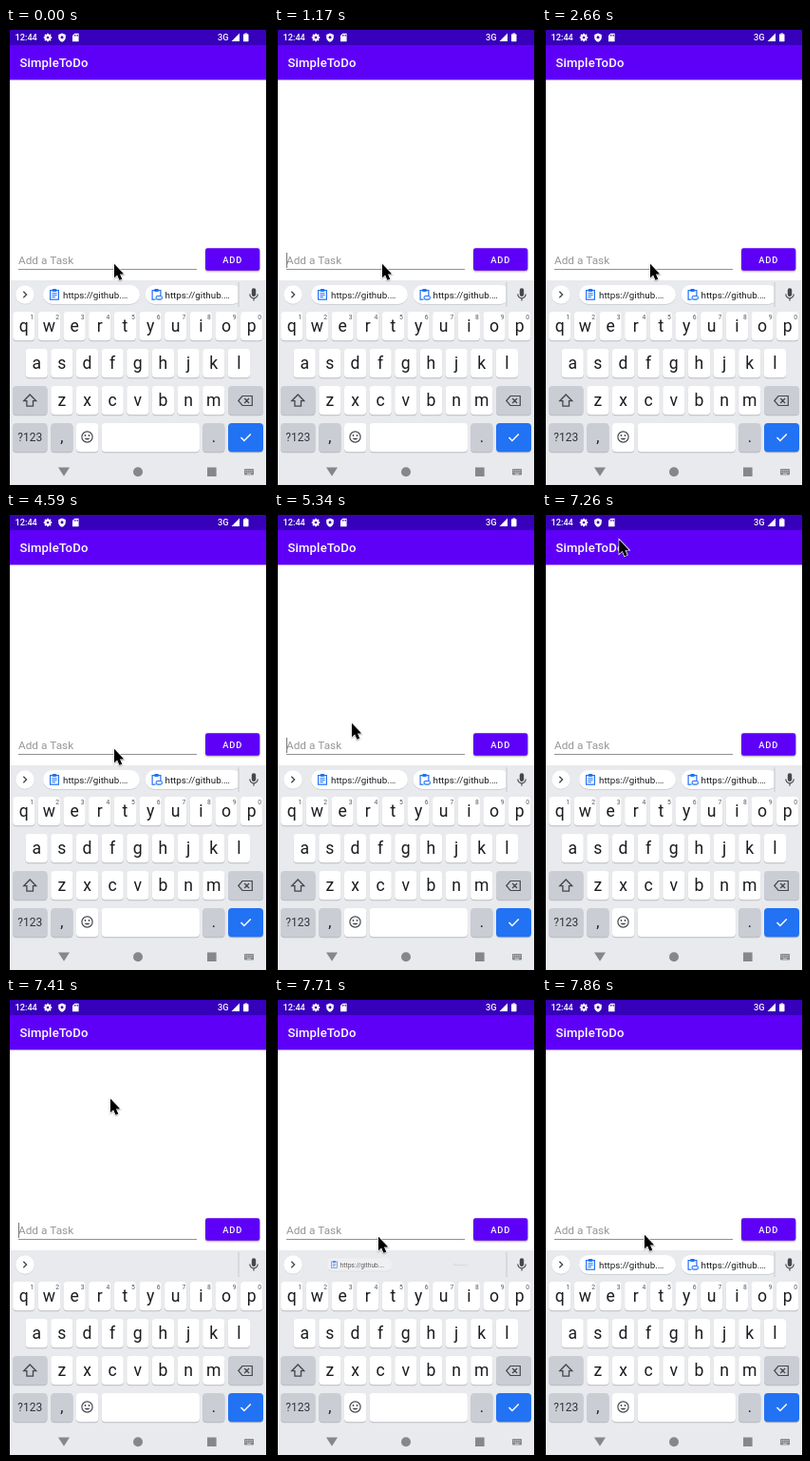
Write an HTML page with a canvas that moves like this. It is 276 px wide and 480 px high and loops after 8000 ms.

```html
<!DOCTYPE html>
<html lang="en">
<head>
<meta charset="utf-8">
<style>
  html, body { margin: 0; width: 100%; height: 100%; overflow: hidden; background: #000; }
  canvas { display: block; width: 276px; height: 480px; }
</style>
</head>
<body>
<canvas id="stage"></canvas>
<script>
const W = 276, H = 480, LOOP = 8000;
const canvas = document.getElementById('stage');
const ctx = canvas.getContext('2d');
const dpr = window.devicePixelRatio || 1;
canvas.width = W * dpr;
canvas.height = H * dpr;

const PURPLE = '#5e00f7', DARK_PURPLE = '#3700ba', BLUE = '#2272f4';
const PANEL = '#e8eaed', SPECIAL = '#cbcdd5', INK = '#1b1c1f', ICON = '#44474c';

// Start time, tip x, tip y; a missing position hides the pointer.
const pointerSteps = [
  [0, 114, 248], [5190, 93, 247.5], [5340, 82, 221], [5490, 76, 185], [5640, 78, 59],
  [5780, 89.5, -6], [5930], [7260, 81.5, 28.5], [7410, 110, 106], [7560, 110, 251], [7860, 108, 249]
];
const caretToggles = [130, 570, 1170, 1610, 2060, 2660, 3100, 3550, 4000, 4590,
  5040, 5640, 6070, 6520, 7410, 7710];

function rect(x, y, w, h, color) {
  ctx.fillStyle = color;
  ctx.fillRect(x, y, w, h);
}

function round(x, y, w, h, r, color) {
  ctx.fillStyle = color;
  ctx.beginPath();
  ctx.roundRect(x, y, w, h, r);
  ctx.fill();
}

function disc(x, y, r, color) {
  ctx.fillStyle = color;
  ctx.beginPath();
  ctx.arc(x, y, r, 0, Math.PI * 2);
  ctx.fill();
}

function ring(x, y, r, color, width) {
  ctx.strokeStyle = color;
  ctx.lineWidth = width;
  ctx.beginPath();
  ctx.arc(x, y, r, 0, Math.PI * 2);
  ctx.stroke();
}

function shape(d, x, y, { fill, stroke, width = 1.2 }) {
  const path = new Path2D(d);
  ctx.save();
  ctx.translate(x, y);
  if (stroke) {
    ctx.strokeStyle = stroke;
    ctx.lineWidth = width;
    ctx.stroke(path);
  }
  if (fill) {
    ctx.fillStyle = fill;
    ctx.fill(path);
  }
  ctx.restore();
}

function text(str, x, y, size, color, { weight = 400, align = 'left', spacing = 0 } = {}) {
  ctx.font = `${weight} ${size}px Roboto, sans-serif`;
  ctx.textAlign = align;
  ctx.letterSpacing = spacing + 'px';
  ctx.fillStyle = color;
  ctx.fillText(str, x, y);
}

function drawStatusBar() {
  rect(4, 2, 270, 16, DARK_PURPLE);
  text('12:44', 9.5, 13.3, 9.2, '#fff', { weight: 500 });
  for (let i = 0; i < 4; i++) {
    ctx.save();
    ctx.translate(44, 10);
    ctx.rotate(i * Math.PI / 4);
    rect(-1, -4.2, 2, 8.4, '#fff');
    ctx.restore();
  }
  ring(44, 10, 2.4, '#fff', 1.8);
  disc(44, 10, 1.3, DARK_PURPLE);
  shape('M0-4.5L3.8-3V0Q3.6 3.3 0 4.8Q-3.6 3.3-3.8 0V-3Z', 59, 10, { fill: '#fff' });
  disc(59, 9.8, 1.5, DARK_PURPLE);
  shape('M-1-4.2H3.3V4.2H-3.3V-2Z', 73.3, 10, { fill: '#fff' });
  for (let i = 0; i < 3; i++) rect(72 + i * 1.6, 7, 0.8, 1.6, DARK_PURPLE);
  text('3G', 223, 13.3, 9.2, '#fff', { weight: 500 });
  shape('M0 0V-8.5L-8.5 0Z', 246, 14, { fill: '#fff' });
  round(250, 6.2, 5.5, 8, 0.7, '#fff');
  rect(251.6, 5.4, 2.3, 1, '#fff');
}

function drawApp(caretOn) {
  rect(4, 54, 270, 211, '#fff');
  rect(4, 18, 270, 36.5, PURPLE);
  text('SimpleToDo', 14.4, 41.3, 13.1, '#fff', { weight: 500, spacing: 0.17 });
  text('Add a Task', 13, 248.2, 11.8, '#969696');
  rect(13, 253, 188, 0.9, '#858585');
  ctx.save();
  ctx.shadowColor = 'rgba(0,0,0,.35)';
  ctx.shadowBlur = 2 * dpr;
  ctx.shadowOffsetY = dpr;
  round(210, 231.3, 57.3, 23.5, 2.4, PURPLE);
  ctx.restore();
  text('ADD', 228.3, 246.5, 9.3, '#fff', { weight: 500, spacing: 0.8 });
  if (caretOn) rect(13, 236, 1, 16, '#777');
}

function drawClipboard(x, y, linked) {
  ctx.strokeStyle = BLUE;
  ctx.lineWidth = 1.2;
  ctx.strokeRect(x - 4.4, y - 4.4, 8.8, 9.6);
  round(x - 2.4, y - 6, 4.8, 3, 1, BLUE);
  if (linked) {
    rect(x - 1, y + 1, 7, 5, '#fff');
    ctx.strokeStyle = BLUE;
    ctx.lineWidth = 1.1;
    ctx.beginPath();
    ctx.roundRect(x - 0.5, y + 1.5, 6.5, 3.6, 1.8);
    ctx.stroke();
  } else {
    for (let i = 0; i < 3; i++) rect(x - 2.6, y - 1.8 + i * 2, i === 2 ? 3.5 : 5.2, 1, BLUE);
  }
}

function drawChip(center, scale, linked) {
  if (!scale) return;
  ctx.save();
  ctx.beginPath();
  ctx.rect(36, 266, 208.5, 28);
  ctx.clip();
  ctx.globalAlpha = scale;
  ctx.translate(center, 280);
  ctx.scale(scale, scale);
  round(-51, -9.5, 102, 20.3, 10.2, '#c6c8cc');
  round(-51, -10, 102, 20, 10, '#fff');
  drawClipboard(-39, 0, linked);
  text('https://github.…', -30, 3.8, 9.8, INK);
  ctx.restore();
}

function drawStrip(t) {
  disc(20, 280.4, 10, '#cfd1d5');
  disc(20, 280, 9.8, '#fff');
  shape('M-1.7-3.2L1.6 0L-1.7 3.2', 20, 280, { stroke: ICON, width: 1.3 });
  const opening = t >= 7560 && t < 7860, closed = t >= 7410 && t < 7560;
  drawChip(90, closed ? 0 : opening ? 0.68 : 1, false);
  drawChip(197.5, closed ? 0 : opening ? 0.18 : 1, true);
  rect(244.6, 267, 0.9, 26, '#c3c5c9');
  round(258.8, 273.3, 4.4, 8.6, 2.2, ICON);
  shape('M-4.2 0A4.2 4.2 0 0 0 4.2 0M0 4.2V7', 261, 279.6, { stroke: ICON, width: 1.2 });
}

function key(x, y, w, color) {
  round(x, y + 1, w, 30.3, 4, '#b8bac0');
  round(x, y, w, 30.3, 4, color);
}

function letterRow(letters, firstCenter, y, numbered) {
  [...letters].forEach((letter, i) => {
    const x = firstCenter + i * 26.65;
    key(x - 11.6, y, 23.2, '#fff');
    text(letter, x, y + 21.2, 17.6, INK, { align: 'center' });
    if (numbered) text((i + 1) % 10, x + 8.6, y + 8, 6.8, '#55585d', { align: 'center' });
  });
}

function drawKeyboard() {
  letterRow('qwertyuiop', 18.8, 298, true);
  letterRow('asdfghjkl', 32.2, 337, false);
  letterRow('zxcvbnm', 58.9, 376, false);

  key(7, 376, 36.5, SPECIAL);
  shape('M0-6.5L6.5 .2H3.3V5.6H-3.3V.2H-6.5Z', 25.2, 391.5, { stroke: ICON, width: 1.3 });
  key(234, 376, 37, SPECIAL);
  shape('M-7.5 0L-3.3-5H7V5H-3.3ZM-1.2-2.5L3.8 2.5M3.8-2.5L-1.2 2.5', 252.3, 391.5, { stroke: ICON, width: 1.2 });

  key(7, 415, 36.5, SPECIAL);
  text('?123', 25.2, 434, 12, '#303338', { align: 'center' });
  key(47.3, 415, 23.2, SPECIAL);
  text(',', 58.9, 435, 16, INK, { align: 'center' });
  key(74, 415, 23.2, '#fff');
  ring(85.5, 429.5, 5.6, ICON, 1.2);
  disc(83.5, 428, 0.9, ICON);
  disc(87.5, 428, 0.9, ICON);
  shape('M-3 1.2Q0 5 3 1.2Z', 85.5, 429.5, { fill: ICON });
  key(100.6, 415, 103.3, '#fff');
  key(207.2, 415, 23.2, SPECIAL);
  text('.', 218.8, 435, 16, INK, { align: 'center' });
  key(234, 415, 37, BLUE);
  shape('M-5 0L-1.6 3.5L5.3-3.5', 252.5, 430, { stroke: '#fff', width: 1.5 });
}

function drawNavigation() {
  const gray = '#85878a';
  shape('M-6-4.5H6L0 4.8Z', 61, 466, { fill: gray });
  disc(139, 466.3, 5, gray);
  rect(212, 461.5, 9.6, 9.5, gray);
  round(251, 463, 10, 6.5, 0.8, gray);
  for (let row = 0; row < 2; row++)
    for (let col = 0; col < 4; col++) rect(252.2 + col * 2.1, 464.2 + row * 1.7, 1, 0.8, PANEL);
  rect(253.8, 467.8, 4.4, 0.8, PANEL);
}

function drawPointer(t) {
  const [, x, y] = pointerSteps.findLast(step => step[0] <= t);
  if (x === undefined) return;
  ctx.save();
  ctx.shadowColor = 'rgba(0,0,0,.3)';
  ctx.shadowBlur = 1.5 * dpr;
  ctx.shadowOffsetY = 0.7 * dpr;
  shape('M0 0V14L3.2 11.1L5.6 16.5L8 15.4L5.6 10.2H9.8Z', x, y, { fill: '#000', stroke: '#fff', width: 1.8 });
  ctx.restore();
  shape('M0 0V14L3.2 11.1L5.6 16.5L8 15.4L5.6 10.2H9.8Z', x, y, { fill: '#000' });
}

function draw(t) {
  ctx.setTransform(dpr, 0, 0, dpr, 0, 0);
  rect(0, 0, W, H, '#000');
  drawStatusBar();
  drawApp(caretToggles.filter(time => time <= t).length % 2 === 1);
  rect(4, 265, 270, 215, PANEL);
  drawStrip(t);
  drawKeyboard();
  drawNavigation();
  drawPointer(t);
}

const start = performance.now();
function tick() {
  draw((performance.now() - start) % LOOP);
  requestAnimationFrame(tick);
}
tick();
</script>
</body>
</html>
```
